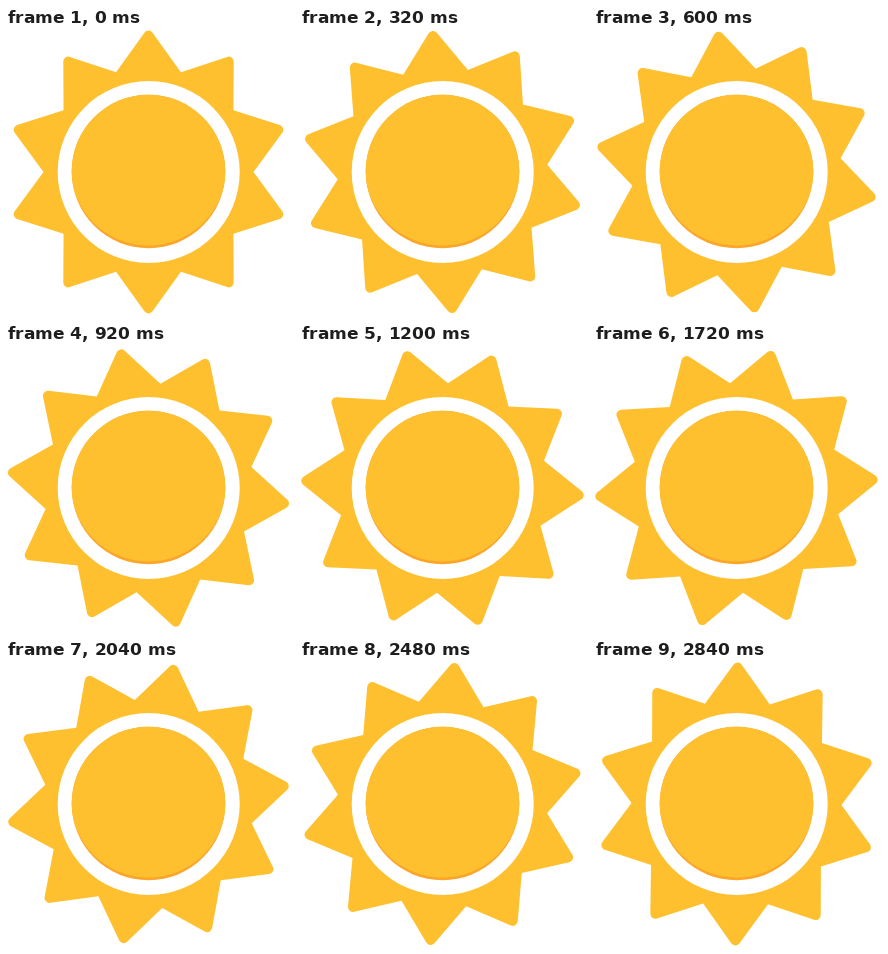
These frames come from a looping animation (288x288 px, 2.88 s). An HTML page with a canvas:

```html
<!DOCTYPE html>
<html lang="en">
<head>
<meta charset="utf-8">
<title>Sun</title>
<style>
  html, body { margin: 0; width: 100%; height: 100%; overflow: hidden; background: #fff; }
  canvas { display: block; width: 288px; height: 288px; }
</style>
</head>
<body>
<canvas id="stage"></canvas>
<script>
const SIZE = 288, LOOP = 2880, STEP = 40;
const CX = 142.5, CY = 144;
const RAYS = 10, TIP = 145, VALLEY = 105, ROUND = 5;
const YELLOW = '#fec02f', ORANGE = '#fba62a', WHITE = '#fff';

const canvas = document.getElementById('stage');
const ctx = canvas.getContext('2d');
const ratio = window.devicePixelRatio || 1;
canvas.width = canvas.height = Math.round(SIZE * ratio);
ctx.scale(canvas.width / SIZE, canvas.height / SIZE);

function disc(x, y, r, color) {
  ctx.fillStyle = color;
  ctx.beginPath();
  ctx.arc(x, y, r, 0, Math.PI * 2);
  ctx.fill();
}

function polar(r, angle) {
  return [r * Math.sin(angle), -r * Math.cos(angle)];
}

function rays(turn) {
  const gap = Math.PI * 2 / RAYS;
  ctx.save();
  ctx.translate(CX, CY);
  ctx.rotate(turn);
  ctx.fillStyle = YELLOW;
  ctx.beginPath();
  ctx.moveTo(...polar(VALLEY, -gap / 2));
  for (let i = 0; i < RAYS; i++) {
    const valley = polar(VALLEY, (i + 0.5) * gap);
    ctx.arcTo(...polar(TIP, i * gap), ...valley, ROUND);
    ctx.lineTo(...valley);
  }
  ctx.closePath();
  ctx.fill();
  ctx.restore();
}

function draw(now) {
  // One loop turns the star back by exactly one ray, in discrete ticks.
  const time = Math.floor((now % LOOP) / STEP) * STEP;
  ctx.fillStyle = WHITE;
  ctx.fillRect(0, 0, SIZE, SIZE);
  rays(-time / LOOP * Math.PI * 2 / RAYS);
  disc(142.7, 144, 91, WHITE);
  disc(142.5, 143.5, 76.8, ORANGE);
  // The face sits slightly higher, leaving a thin shade below.
  ctx.save();
  ctx.beginPath();
  ctx.arc(142.5, 143.5, 76.8, 0, Math.PI * 2);
  ctx.clip();
  disc(142.5, 139.5, 78, YELLOW);
  ctx.restore();
}

const start = performance.now();
function frame() {
  draw(performance.now() - start);
  requestAnimationFrame(frame);
}
frame();
</script>
</body>
</html>
```
